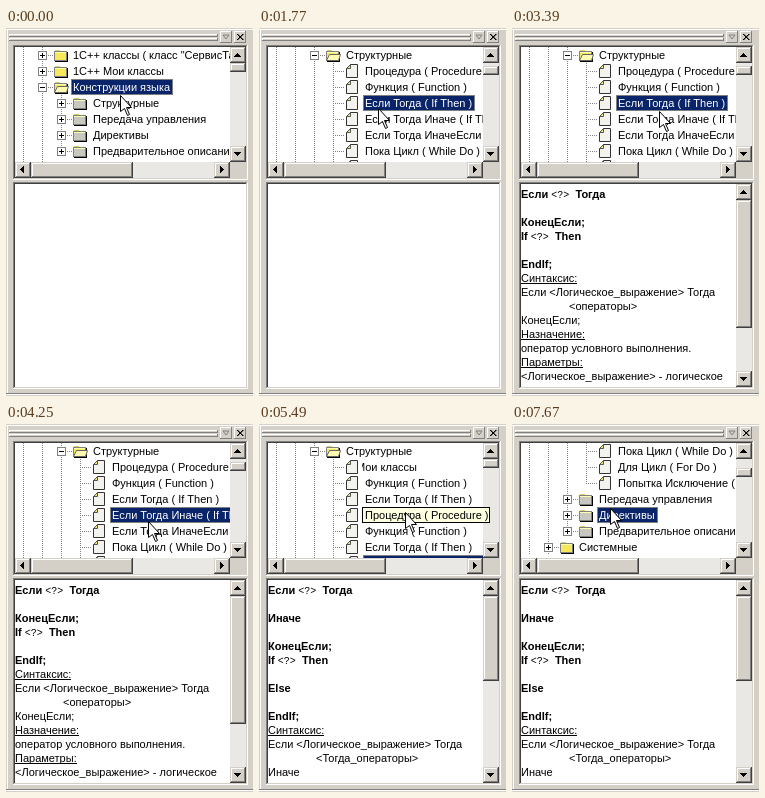
Recreate the animation shown at these times as an HTML page with a canvas. Size 247x368 px, loop 8 s.

```html
<!DOCTYPE html>
<html lang="ru">
<head>
<meta charset="utf-8">
<style>
html, body { margin: 0; width: 100%; height: 100%; overflow: hidden; background: #d4d0c8; }
canvas { display: block; }
</style>
</head>
<body>
<canvas id="stage" width="247" height="368"></canvas>
<script>
const g = document.getElementById('stage').getContext('2d');
const LOOP = 8000;
const FACE = '#d4d0c8', SHADE = '#808080', DARK = '#404040', TRACK = '#eae8e4', NAVY = '#0a246a';
const FONT = '11px "Liberation Sans", Arial, sans-serif';
const MONO = '10px "Liberation Mono", monospace';
const ROOT_X = 17, BRANCH_X = [36, 55, 74], ROW = 16, TOP = 27;

const items = [
  [0, '1С++ классы ( класс "СервисТаблица" )'], [0, '1С++ Мои классы'], [0, 'Конструкции языка'],
  [1, 'Структурные'], [2, 'Процедура ( Procedure )'], [2, 'Функция ( Function )'],
  [2, 'Если Тогда ( If Then )'], [2, 'Если Тогда Иначе ( If Then Else )'],
  [2, 'Если Тогда ИначеЕсли ( If Then ElsIf )'], [2, 'Пока Цикл ( While Do )'],
  [2, 'Для Цикл ( For Do )'], [2, 'Попытка Исключение ( Try Except )'],
  [1, 'Передача управления'], [1, 'Директивы'], [1, 'Предварительное описание'], [0, 'Системные'],
].map(([level, text], id) => ({ id, level, text }));
const LANGUAGE = 2, GROUP = 3, LAST_LEAF = 11, LAST_GROUP = 14;

// "*" marks bold, "_" underlined, "~" indented lines
const docs = {
  none: null,
  ifThen: ['*Если <?>  Тогда', '', '*КонецЕсли;', '*If <?>  Then', '', '*EndIf;', '_Синтаксис:',
    'Если <Логическое_выражение> Тогда', '~<операторы>', 'КонецЕсли;', '_Назначение:',
    'оператор условного выполнения.', '_Параметры:', '<Логическое_выражение> - логическое'],
  ifElse: ['*Если <?>  Тогда', '', '*Иначе', '', '*КонецЕсли;', '*If <?>  Then', '', '*Else', '',
    '*EndIf;', '_Синтаксис:', 'Если <Логическое_выражение> Тогда', '~<Тогда_операторы>', 'Иначе'],
};

const pointer = [
  [0, 114, 67], [140, 111, 71], [260, 110, 71], [680, 109, 80], [800, 109, 89], [960, 114, 88],
  [1090, 119, 86], [1490, 119, 82], [1630, 119, 80], [2310, 117, 89], [2460, 118, 112],
  [2580, 121, 167], [2710, 108, 188], [2830, 97, 201], [2980, 122, 166], [3100, 140, 117],
  [3240, 144, 102], [3390, 147, 83], [3980, 146, 87], [4130, 144, 92], [4250, 142, 97],
  [4830, 144, 93], [4950, 146, 88], [6290, 118, 79], [6440, 114, 79], [6840, 104, 87],
  [6960, 100, 92], [7090, 98, 96], [7360, 98, 85], [7670, 98, 84],
];
const selected = [[0, LANGUAGE], [260, GROUP], [1770, 6], [4250, 7], [6960, 13]];
const firstRow = [[0, 0], [540, 3], [4700, 0], [5490, 3], [5620, 6], [5760, 9]];
const docAt = [[0, 'none'], [1900, 'ifThen'], [4400, 'ifElse']];
const at = (track, t) => track.findLast(key => key[0] <= t);

function rect(x, y, w, h, color) {
  g.fillStyle = color;
  g.fillRect(x, y, w, h);
}

function bevel(x, y, w, h, light, dark) {
  rect(x, y, w, 1, light);
  rect(x, y, 1, h, light);
  rect(x, y + h - 1, w, 1, dark);
  rect(x + w - 1, y, 1, h, dark);
}

function raised(x, y, w, h) {
  rect(x, y, w, h, FACE);
  bevel(x, y, w, h, FACE, DARK);
  bevel(x + 1, y + 1, w - 2, h - 2, '#fff', SHADE);
}

function sunken(x, y, w, h) {
  rect(x, y, w, h, '#fff');
  bevel(x, y, w, h, SHADE, '#fff');
  bevel(x + 1, y + 1, w - 2, h - 2, DARK, FACE);
}

function polygon(points, fill, stroke) {
  g.beginPath();
  points.forEach(([x, y]) => g.lineTo(x, y));
  g.closePath();
  g.fillStyle = fill;
  g.fill();
  if (stroke) {
    g.strokeStyle = stroke;
    g.lineWidth = 1;
    g.stroke();
  }
}

function arrowButton(x, y, dx, dy) {
  raised(x, y, 16, 16);
  for (let i = 0; i < 4; i++) {
    const size = 2 * i + 1, along = dx + dy < 0 ? 6 + i : 9 - i;
    if (dx) rect(x + along + (dx < 0 ? -1 : 0), y + 7 - i, 1, size, '#000');
    else rect(x + 7 - i, y + along, size, 1, '#000');
  }
}

function vScroll(y, h, thumbY, thumbH) {
  rect(224, y, 16, h, TRACK);
  arrowButton(224, y, 0, -1);
  arrowButton(224, y + h - 16, 0, 1);
  raised(224, thumbY, 16, thumbH);
}

function label(text, x, y, color = '#000', font = FONT) {
  g.font = font;
  g.fillStyle = color;
  g.fillText(text, x, y);
  return g.measureText(text).width;
}

function dots(x, y, w, h) {
  for (let i = 0; i < w; i += 2) for (let j = 0; j < h; j += 2) rect(x + i, y + j, 1, 1, SHADE);
}

function clipped(x, y, w, h, paint) {
  g.save();
  g.beginPath();
  g.rect(x, y, w, h);
  g.clip();
  paint();
  g.restore();
}

function folder(x, c, color, open) {
  rect(x + 1, c - 5, 5, 2, '#d8d060');
  rect(x, c - 4, 13, 10, SHADE);
  rect(x + 1, c - 3, 11, 8, color);
  rect(x + 1, c - 3, 11, 1, '#ffffb0');
  rect(x + 1, c + 6, 13, 1, '#000');
  rect(x + 13, c - 3, 1, 9, '#000');
  if (open) polygon([[x + 3.5, c - .5], [x + 14.5, c - .5], [x + 12.5, c + 5.5], [x + .5, c + 5.5]], '#fffbb0', '#666');
}

function page(x, c) {
  polygon([[x + 4.5, c - 6.5], [x + 11.5, c - 6.5], [x + 11.5, c + 6.5], [x + .5, c + 6.5], [x + .5, c - 2.5]],
    '#f3f2ec', '#333');
  polygon([[x + 4.5, c - 6.5], [x + 4.5, c - 2.5], [x + .5, c - 2.5]], '#f0e860', '#555');
}

function treeRow(item, c, expanded, isSelected) {
  const { id, level, text } = item, bx = BRANCH_X[level], x = [68, 88, 107][level];
  dots(ROOT_X, c - 8, 1, 16);
  for (let n = 0; n <= level; n++) {
    const ends = n === level && (id === LAST_LEAF || id === LAST_GROUP);
    dots(BRANCH_X[n], c - 8, 1, ends ? 9 : 16);
  }
  dots(bx, c, 12, 1);
  const open = id === LANGUAGE || (id === GROUP && expanded);
  if (level === 2) page(87, c);
  else {
    rect(bx - 4, c - 4, 9, 9, SHADE);
    rect(bx - 3, c - 3, 7, 7, '#fff');
    rect(bx - 2, c, 5, 1, '#000');
    if (!open) rect(bx, c - 2, 1, 5, '#000');
    folder(bx + 12, c, level && !open ? '#c8c8c0' : '#f6e85a', open);
  }
  if (isSelected) {
    g.font = FONT;
    const w = Math.round(g.measureText(text).width) + 5;
    rect(x - 3, c - 8, w, 16, NAVY);
    g.setLineDash([1, 1]);
    g.strokeStyle = '#f5db95';
    g.lineWidth = 1;
    g.strokeRect(x - 2.5, c - 7.5, w - 1, 15);
    g.setLineDash([]);
  }
  label(text, x - 1, c + 4, isSelected ? '#fff' : '#000');
}

function treeRows(first, expanded, selection) {
  rect(9, 19, 215, 115, '#fff');
  items.filter(item => expanded || item.level < 2).slice(first, first + 8)
    .forEach((item, i) => treeRow(item, TOP + ROW * i, expanded, item.id === selection));
}

function tree(t) {
  const first = at(firstRow, t)[1], selection = at(selected, t)[1], expanded = t >= 540;
  const repainting = t >= 5490 && t < 5620;
  sunken(7, 17, 235, 135);
  clipped(9, 19, 215, 115, () => treeRows(first, expanded, selection));

  // Half-finished repaint: some labels linger from the previous scroll position.
  if (repainting) {
    for (const [y, h] of [[35, 16], [83, 51]]) {
      clipped(103, y, 121, h, () => treeRows(0, true, selection));
    }
  }

  vScroll(19, 115, 35 + (repainting ? 0 : first), 9);
  rect(9, 134, 215, 16, TRACK);
  arrowButton(9, 134, -1, 0);
  arrowButton(208, 134, 1, 0);
  raised(25, 134, 102, 16);
  rect(224, 134, 16, 16, FACE);

  if (t >= 5070 && t < 5620) {
    const text = items[4].text;
    g.font = FONT;
    const w = Math.round(g.measureText(text).width) + 5;
    rect(103, 83, w, 16, '#000');
    rect(104, 84, w - 2, 14, '#ffffe1');
    label(text, 106, 95);
  }
}

function boldLine(text, x, y) {
  for (const part of text.split(/(<\?>)/)) {
    x += label(part, x, y, '#000', part === '<?>' ? MONO : 'bold ' + FONT);
  }
}

function description(t) {
  sunken(7, 154, 235, 207);
  const name = at(docAt, t)[1], lines = docs[name];
  if (!lines) return;
  clipped(9, 156, 215, 203, () => lines.forEach((line, i) => {
    const mark = '*_~'.includes(line[0]) ? line[0] : '';
    const text = line.slice(mark.length), x = mark === '~' ? 57 : 9, y = 170 + 14 * i;
    if (mark === '*') return boldLine(text, x, y);
    const width = label(text, x, y);
    if (mark === '_') rect(x, y + 1, Math.round(width), 1, '#000');
  }));
  vScroll(156, 203, 172, name === 'ifThen' ? 128 : 85);
}

function frame() {
  rect(0, 0, 247, 368, FACE);
  rect(0, 1, 247, 1, '#fff');
  rect(1, 1, 1, 364, '#fff');
  rect(0, 365, 247, 1, SHADE);
  rect(0, 366, 247, 1, '#fff');
  for (const y of [6, 10]) bevel(3, y, 209, 3, '#fff', SHADE);
  for (const x of [214, 228]) {
    rect(x, 3, 12, 12, FACE);
    bevel(x, 3, 12, 12, '#fff', SHADE);
  }
  polygon([[217, 7], [223, 7], [220, 11]], FACE, SHADE);
  for (let i = 0; i < 6; i++) {
    rect(231 + i, 6 + i, 1.5, 1, '#000');
    rect(236 - i, 6 + i, 1.5, 1, '#000');
  }
}

function cursor(t) {
  const [, x, y] = at(pointer, t);
  if (t >= 2580 && t < 3100) {
    rect(x, y - 7, 1, 14, '#000');
    for (const end of [y - 8, y + 7]) {
      rect(x - 3, end, 3, 1, '#000');
      rect(x + 1, end, 3, 1, '#000');
    }
    return;
  }
  const shape = [[0, 0], [0, 16], [4, 13], [7, 20], [9, 19], [6, 12], [11, 12]];
  polygon(shape.map(([dx, dy]) => [x + dx + .5, y + dy + .5]), '#fff', '#000');
}

function draw(now) {
  const t = now % LOOP;
  frame();
  tree(t);
  description(t);
  cursor(t);
}

let start;
function tick(now) {
  start ??= now;
  draw(now - start);
  requestAnimationFrame(tick);
}
draw(0);
requestAnimationFrame(tick);
</script>
</body>
</html>
```
